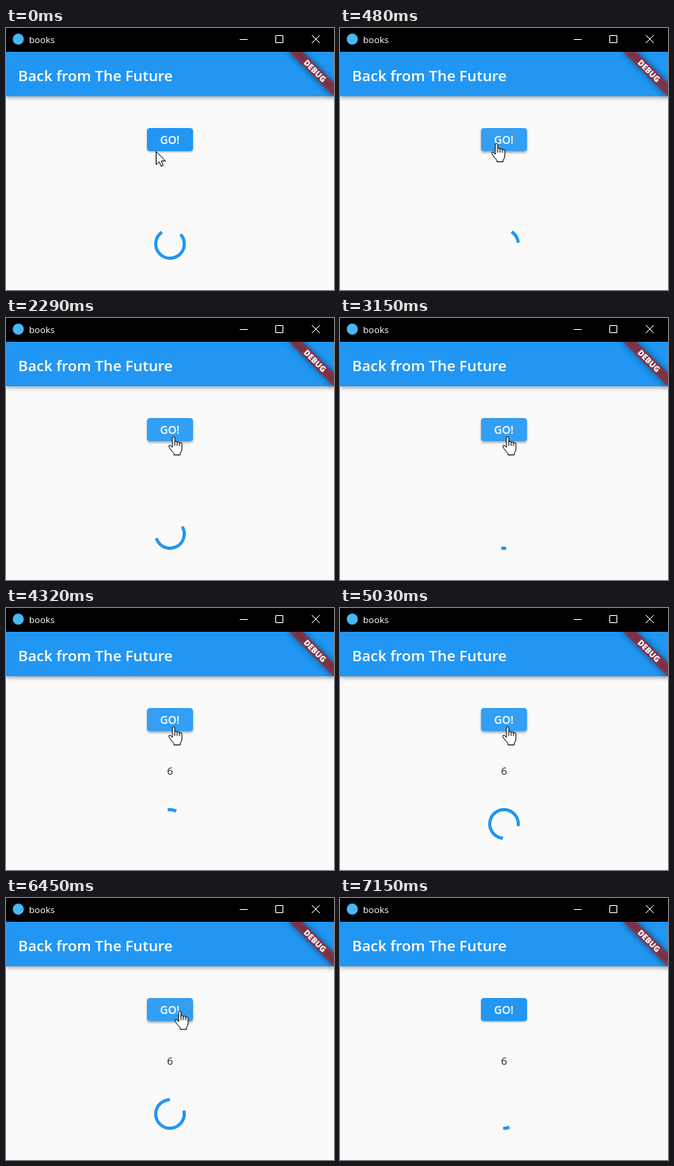
These frames come from a looping animation (414x330 px, 7.23 s). An HTML page:

```html
<!DOCTYPE html>
<html lang="en">
<head>
<meta charset="utf-8">
<title>books</title>
<style>
  html, body { margin: 0; width: 100%; height: 100%; overflow: hidden; background: #fafafa; }
  svg { display: block; width: 414px; height: 330px; font-family: "Open Sans", sans-serif; }
  .semibold { font-weight: 600; fill: #fff; }
  .bar { filter: drop-shadow(0 2px 2.5px rgba(0, 0, 0, .35)); }
  .pointer { fill: #fff; stroke: #000; stroke-linejoin: round; }
</style>
</head>
<body>
<svg viewBox="0 0 414 330">
  <defs>
    <filter id="soft" x="-50%" y="-150%" width="200%" height="400%">
      <feGaussianBlur stdDeviation="4"/>
    </filter>
    <clipPath id="client"><rect y="30" width="414" height="300"/></clipPath>
  </defs>
  <rect width="414" height="330" fill="#fafafa"/>

  <rect class="bar" y="30" width="414" height="56" fill="#2196f3"/>
  <text class="semibold" x="15.3" y="67" font-size="18.8">Back from The Future</text>

  <g clip-path="url(#client)">
    <g transform="translate(414 30) rotate(45)">
      <rect x="-40" y="28" width="80" height="12" opacity=".5" filter="url(#soft)"/>
      <rect x="-40" y="28" width="80" height="12" fill="#b71c1c" opacity=".627"/>
      <text y="37.7" font-size="10.2" font-weight="800" fill="#fff" text-anchor="middle">DEBUG</text>
    </g>
  </g>

  <rect width="414" height="30"/>
  <circle cx="15.5" cy="14" r="7" fill="#47b8f5"/>
  <text x="29" y="19" font-size="11.5" fill="#fff">books</text>
  <path d="M295 14.5h10M340.5 9.5h9v9h-9zM386 9l10 10M396 9l-10 10" fill="none" stroke="#fff"/>

  <rect id="button" x="178" y="126" width="58" height="29" rx="4" fill="#2196f3"/>
  <rect id="overlay" x="178" y="126" width="58" height="29" rx="4" fill="#fff"/>
  <text class="semibold" x="206.7" y="146" font-size="13.7" text-anchor="middle">GO!</text>

  <text id="result" x="207" y="210" font-size="13.5" fill-opacity=".87" text-anchor="middle">6</text>
  <path id="spinner" fill="none" stroke="#2196f3" stroke-width="4" stroke-linecap="square"/>

  <path id="arrow" class="pointer" d="M0 0V16.5L3.9 13L6.4 18.8L9 17.7L6.5 12H11.7Z"/>
  <path id="hand" class="pointer" d="M-1.5 14V2a1.5 1.5 0 0 1 3 0V7.5a1.5 1.5 0 0 1 3 .5a1.5 1.5 0 0 1 3 1a1.5 1.5 0 0 1 3 1V16q0 3-2 5V23.5H.5V21.5Q-2 19-4.5 15.5Q-7 12-5.5 11.3Q-3.5 10.7-1.5 14ZM1.5 7.5V12M4.5 8V12M7.5 9V12"/>
</svg>
<script>
const LOOP = 7230, FIRST = 90, STEP = 78.44;
const SPIN_START = 4550, SPIN_STEP = 82.8;
const [button, overlay, result, spinner, arrow, hand] =
  ['button', 'overlay', 'result', 'spinner', 'arrow', 'hand'].map(id => document.getElementById(id));

const ramp = (t, from, to) => Math.min(1, Math.max(0, (t - from) / (to - from)));

// Cubic bezier easing (.4, 0, .2, 1), solved by bisection.
function fastOutSlowIn(x) {
  if (x <= 0) return 0;
  if (x >= 1) return 1;
  let lo = 0, hi = 1;
  for (let i = 0; i < 24; i++) {
    const s = (lo + hi) / 2, r = 1 - s;
    if (1.2 * r * r * s + .6 * r * s * s + s ** 3 < x) lo = s; else hi = s;
  }
  return 3 * (1 - lo) * lo * lo + lo ** 3;
}

// Arc that grows then shrinks every 1333 ms while turning once every 2222 ms.
function spinnerPath(ms) {
  const phase = ms / 1333 % 1, turn = ms / 2222 % 1;
  const head = fastOutSlowIn(phase * 2), tail = fastOutSlowIn(phase * 2 - 1);
  const start = Math.PI * (-.5 + 1.5 * tail + 2 * turn + .5 * phase);
  const sweep = Math.max(1.5 * Math.PI * (head - tail), .001);
  const point = a => `${207 + 18 * Math.cos(a)} ${272 + 18 * Math.sin(a)}`;
  return `M${point(start)}A18 18 0 ${+(sweep > Math.PI)} 1 ${point(start + sweep)}`;
}

function show(element, visible) {
  element.style.display = visible ? '' : 'none';
}

function draw(time) {
  // The picture is held between steps.
  const step = Math.max(0, Math.floor((time - FIRST) / STEP + .08) + 1);
  const t = step ? FIRST + (step - 1) * STEP : 0;

  spinner.setAttribute('d', spinnerPath(SPIN_START + step * SPIN_STEP));
  show(result, t >= 4100);

  const hover = ramp(t, 160, 330) - ramp(t, 6700, 6900);
  const press = ramp(t, 930, 1050) - ramp(t, 1190, 1500);
  const lift = 1 + hover + 1.5 * press;
  button.style.filter = `drop-shadow(0 ${lift}px ${lift * .8}px rgba(0,0,0,.35))`;
  overlay.setAttribute('opacity', .08 * hover + .22 * press);

  // Approach the button, drift down after the click, leave to the right.
  const approach = ramp(t, 90, 800), drift = ramp(t, 1190, 1500);
  const x = 189.5 + 14.5 * approach + 7.5 * drift + 22 * ramp(t, 6300, 6700);
  const y = 155.5 - 19 * approach + 12.5 * drift - 10 * ramp(t, 5800, 6700);
  const present = t < 6700, over = y < 155;
  show(arrow, present && !over);
  show(hand, present && over);
  for (const pointer of [arrow, hand]) pointer.setAttribute('transform', `translate(${x} ${y})`);
}

const begin = performance.now();
function tick() {
  draw((performance.now() - begin) % LOOP);
  requestAnimationFrame(tick);
}
tick();
</script>
</body>
</html>
```
